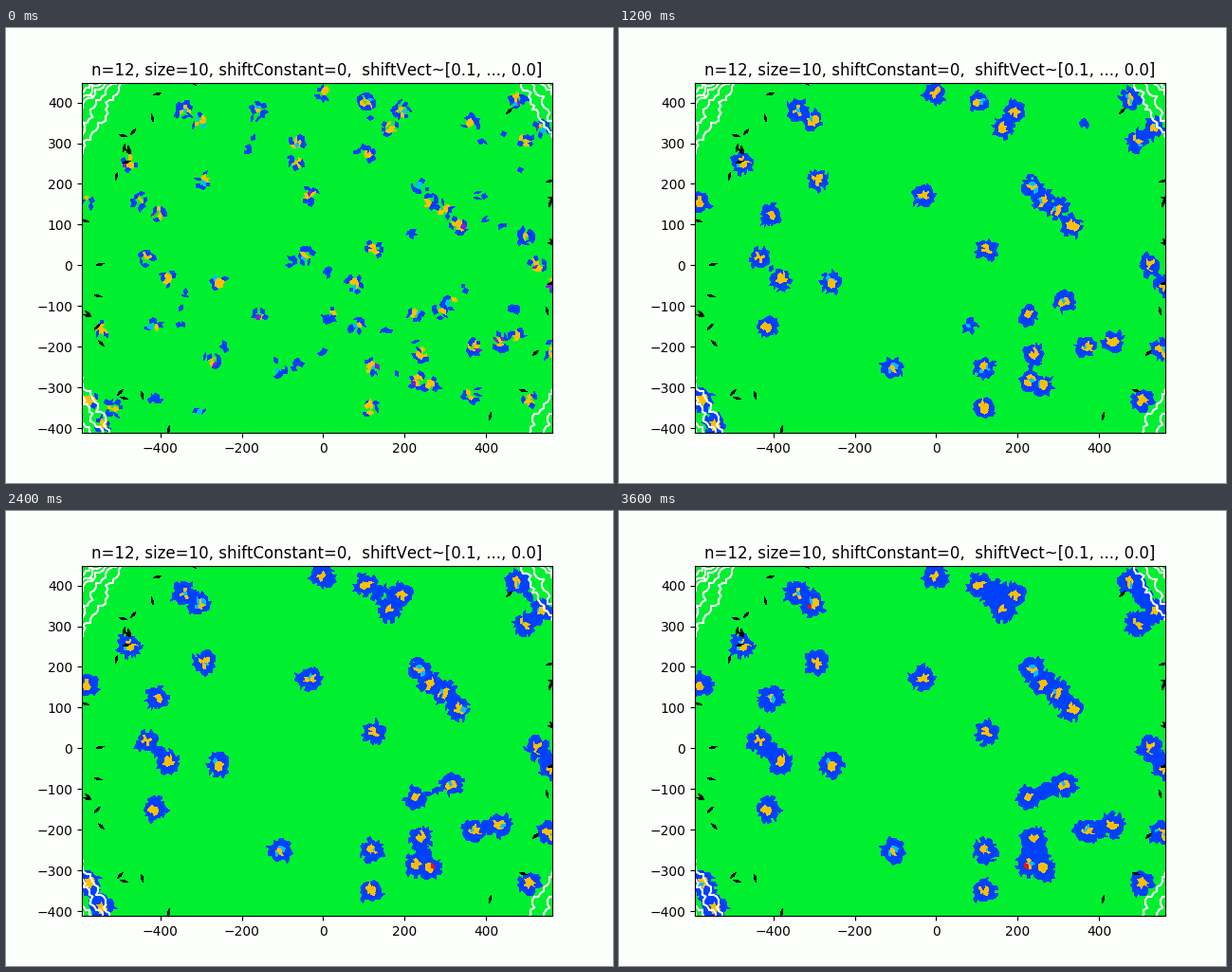
Recreate the animation shown at these times as a matplotlib script. Size 640 px wide and 480 px high, loop 3.8 s.

```python
import itertools

import matplotlib.pyplot as plt
import numpy as np
from matplotlib.animation import FuncAnimation
from matplotlib.collections import LineCollection, PolyCollection

FRAMES, STEP_MS = 19, 200
N, SIZE, SIDE = 12, 10, 10
PAPER, GREEN = "#fdfffc", "#00f030"
PALETTE = np.array(["#0040ff", "#ffbf00", "#00bfff", "#8020d8", "#e81020"])
BLUE, ORANGE, CYAN, PURPLE, RED = range(5)
SCALE, ORIGIN = 0.429, np.array([334.5, 250.5])
BRIDGE_REACH = 41.5

# Centres of the lasting colonies, in pixels
COLONIES = np.array([
    (188, 87), (204, 98), (334, 69), (380, 78), (416, 88), (405, 105),
    (539, 76), (547, 120), (565, 106), (130, 142), (209, 160), (320, 177),
    (436, 168), (447, 183), (462, 191), (477, 209), (388, 234), (560, 250),
    (576, 271), (149, 243), (171, 265), (160, 197), (86, 184), (224, 268),
    (157, 315), (289, 359), (432, 303), (470, 288), (493, 337), (521, 332),
    (437, 345), (433, 373), (447, 378), (573, 339), (385, 401), (386, 358),
    (551, 393), (88, 393), (101, 418),
])
# Colonies that die out, longest lived first
EMBERS = np.array([
    (370, 314), (491, 100), (114, 401), (367, 270), (141, 183), (306, 142),
    (548, 220), (491, 388), (316, 239), (268, 304), (100, 318), (217, 351),
    (267, 88), (307, 121), (342, 302), (458, 299), (540, 326), (381, 135),
])


def rhombus_tiling(reach=13):
    """Multigrid tiling, and the mid-lines of strips that lie past SIZE."""
    angle = 2 * np.pi * np.arange(N) / N
    dirs = np.column_stack([np.cos(angle), np.sin(angle)])
    # Steady offsets, spread so that opposite families never coincide
    shift = 0.18 + 0.15 * np.sin(2.4 * np.arange(N) + 0.3)
    k, l = (a.ravel() for a in np.mgrid[-reach:reach + 1, -reach:reach + 1])
    tiles, seams = [], []
    for i, j in itertools.combinations(range(N), 2):
        if j - i == N // 2:
            continue
        u, v = pair = dirs[[i, j]]
        point = np.linalg.solve(pair, np.array([k - shift[i], l - shift[j]])).T
        index = np.ceil(point @ dirs.T + shift)
        index[:, i], index[:, j] = k, l
        base = index @ dirs
        tiles.append(np.stack([base, base + u, base + u + v, base + v], axis=1))
        for line, across, along in ((k, u, v), (l, v, u)):
            start = base[abs(line) > SIZE] + across / 2
            seams.append(np.stack([start, start + along], axis=1))
    return SIDE * np.concatenate(tiles), SIDE * np.concatenate(seams)


def distances(points):
    return np.hypot(*(centre[:, None] - points).transpose(2, 0, 1))


def segment_distance(a, b):
    along = np.clip((centre - a) @ (b - a) / ((b - a) @ (b - a)), 0, 1)
    return np.hypot(*(centre - a - along[:, None] * (b - a)).T)


rng = np.random.default_rng(12)
tiles, seams = rhombus_tiling()
centre = tiles.mean(axis=1) * [SCALE, -SCALE] + ORIGIN
seen = (abs(centre - (328, 242)) < (256, 192)).all(axis=1)
tiles, centre = tiles[seen], centre[seen]
rough = rng.uniform(-1.7, 1.7, len(tiles))
tint = rng.random(len(tiles))

d_colony = distances(COLONIES).min(axis=1)
pairs = [(a, b) for a, b in itertools.combinations(COLONIES, 2)
         if np.hypot(*(a - b)) < BRIDGE_REACH]
spans = np.array([np.hypot(*(a - b)) for a, b in pairs])
d_bridge = np.column_stack([segment_distance(a, b) for a, b in pairs])

# Short-lived crumbs join the embers at the start
crumbs = rng.uniform((90, 70), (566, 418), (26, 2))
fading = np.vstack([EMBERS, crumbs])
d_fade = distances(fading)
rank = np.arange(len(fading))
life = 1.3 + 10.5 * 0.62 ** rank
fade_size = np.where(rank < len(EMBERS), 8.5, rng.uniform(2.5, 5, len(fading)))


def tile_states(t):
    """Palette index of every tile, -1 where the ground shows."""
    grow = (t / (FRAMES - 1)) ** 0.8
    radius = 9.3 + 3 * grow - 1.2 * (t == 0)
    core = 5.3 - 0.4 * grow
    live = fade_size * np.sqrt(np.clip(1 - t / life, 0, 1))
    live = np.where(live > 0, live, -9)
    bridge = np.minimum(18 * grow - 0.25 * spans, 9)
    ember = (live - d_fade).max(axis=1)
    outer = np.maximum.reduce([radius - d_colony, ember,
                               (bridge - d_bridge).max(axis=1)])
    inner = np.maximum(core - d_colony, ember - 4)

    frame_rng = np.random.default_rng(100 + t)
    flicker, keep = frame_rng.random((2, len(tiles)))
    state = np.full(len(tiles), -1)
    state[outer + rough + 0.8 * (flicker - 0.5) > 0] = BLUE
    heart = inner + 0.7 * rough > 0
    state[heart] = ORANGE
    state[heart & ((tint < 0.05) | (flicker < 0.05))] = CYAN
    state[heart & (flicker > 0.99)] = RED
    if t < 2:
        state[heart & (flicker > 0.95)] = PURPLE
    # The first frames are patchy, then the colonies close up
    state[keep < 0.36 * 0.4 ** t * (t < 4)] = -1
    return state


plt.rcParams["text.kerning_factor"] = 6
fig, ax = plt.subplots(figsize=(6.4, 4.8), dpi=100, facecolor=PAPER)
ax.set_facecolor(GREEN)
ax.set_xlim(-593, 563)
ax.set_ylim(-412, 449)
ax.set_title("n=12, size=10, shiftConstant=0,  shiftVect~[0.1, ..., 0.0]")


def add_tiles(verts, color, zorder):
    layer = PolyCollection(verts, facecolors=color, edgecolors="none",
                           linewidths=0, antialiaseds=False, zorder=zorder)
    return ax.add_collection(layer, autolim=False)


# Dark slivers: narrow tiles scattered over the outer ring
u, v = (tiles[:, 1] - tiles[:, 0]).T, (tiles[:, 3] - tiles[:, 0]).T
narrow = abs(u[0] * v[1] - u[1] * v[0]) < 0.6 * SIDE ** 2
away = np.hypot(*tiles.mean(axis=1).T)
ring = np.flatnonzero(narrow & (away > 545) & (away < 600))

cells = add_tiles([], "none", 1)
ax.add_collection(LineCollection(seams, colors="white", linewidths=1.5,
                                 capstyle="round", zorder=1.2), autolim=False)
add_tiles(tiles[rng.choice(ring, 34, replace=False)], "black", 1.3)


def draw(t):
    state = tile_states(t)
    on = state >= 0
    cells.set_verts(tiles[on])
    cells.set_facecolor(PALETTE[state[on]])
    return [cells]


anim = FuncAnimation(fig, draw, frames=FRAMES, interval=STEP_MS,
                     repeat=True, repeat_delay=0, blit=False)
plt.show()
```
